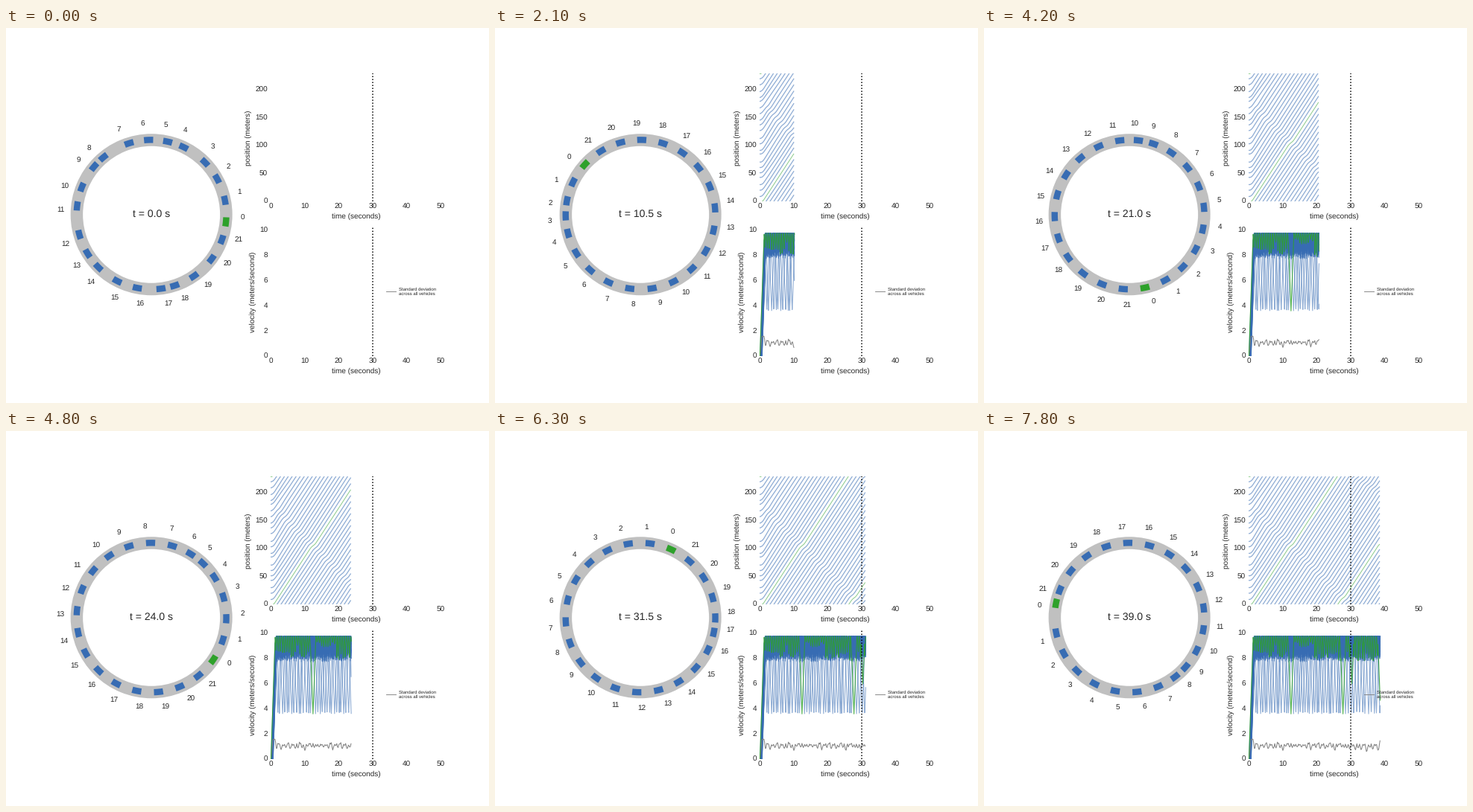
A matplotlib script for the animation above (8000 ms loop, 648x504 px).

```python
import numpy as np
import matplotlib.pyplot as plt
from matplotlib.animation import FuncAnimation
from matplotlib.patches import Wedge

plt.rcParams.update({"font.family": "Liberation Sans", "text.hinting": "none"})
W, H, DPI = 648, 504, 72
BLUE, GREEN, INK = "#376cb3", "#2ea12b", "#262626"
CARS, ROAD, CAR_DEG = 22, 230.0, 7.0
CENTER = (195.15, 250.75)
SPEED, DIP_LOSS, DIP_HALF = 9.31, 5.8, 1.05
SPACING = (ROAD + DIP_LOSS) / CARS
START_DEG = np.array([-2.1, 14.5, 32.1, 47.8, 68, 81, 95.7, 110.9, 133.5, 143.6, 162,
                      176.9, 199, 214.9, 228.3, 246.3, 262.6, 280.8, 291.6, 308.1, 327, 343.9])


def wave_times(n):
    """Moments at which the backward travelling wave reaches car n."""
    times = [12.4 - 0.695 * n + 15.3 * lap for lap in range(3)]
    times = [T + 0.22 * max(0, T - 28.5) for T in times]
    return times + [38.8] if n == 0 else times


def lost(t, T):
    """Distance lost in a triangular dip of speed centred on T."""
    if T < 1.8:
        return DIP_LOSS * np.ones_like(t)
    u = np.clip((t - T) / DIP_HALF, -1, 1)
    return DIP_LOSS * np.where(u < 0, (1 + u) ** 2 / 2, 1 - (1 - u) ** 2 / 2)


def steady(n, t):
    ramp = 1.3
    run = np.where(t < ramp, t ** 2 / (2 * ramp), t - ramp / 2)
    drift = -2.2 * np.sin(2 * np.pi * n / CARS) * t / 4 * np.exp(1 - t / 4)
    return -1.3 + n * SPACING + SPEED * run + drift - sum(lost(t, T) for T in wave_times(n))


def position(n, t):
    t = np.asarray(t, float)
    offset = START_DEG[n] * ROAD / 360 - steady(n, np.array(0.0))
    u = np.clip(t / 5, 0, 1)
    return steady(n, t) + offset * (1 - u * u * (3 - 2 * u))


rng = np.random.default_rng(4)
RATE, PHASE = rng.uniform(0.45, 0.65, CARS), rng.random(CARS)
DELAY, JITTER = rng.uniform(0, 0.65, CARS), rng.uniform(-0.2, 0.2, CARS)
DELAY[0] = JITTER[0] = 0
SWING = rng.uniform(0.6, 2.1, (CARS, 100))


def velocity(n, t):
    cycle = t / RATE[n] + PHASE[n]
    saw = np.abs(2 * (cycle % 1) - 1) ** 1.4
    swing = SWING[n, cycle.astype(int)]
    times = wave_times(n)
    if n == 0:
        calm = (t > times[0]) & (t < times[0] + 7)
        swing = np.where(calm, 0.5 * swing, swing)
    v = 9.8 - swing * saw
    for T in times:
        if T > 1.8:
            v = np.minimum(v, 3.6 + 6.2 * np.abs(t - T - JITTER[n]) / 0.85)
    if n == 0:
        v = np.minimum(v, 6 + 6 * np.abs(t - 30.3))
    return np.minimum(v, np.maximum(0, 7.8 * (t - DELAY[n])))


fig = plt.figure(figsize=(W / DPI, H / DPI), dpi=DPI, facecolor="white")


def panel(left, top, right, bottom, xlim, ylim):
    ax = fig.add_axes([left / W, 1 - bottom / H, (right - left) / W, (bottom - top) / H])
    ax.set(xlim=xlim, ylim=ylim)
    ax.axis("off")
    return ax


stage = panel(0, 0, W, H, (0, W), (H, 0))
pos_ax = panel(355.4, 60.5, 583.2, 233.4, (0, 50), (0, ROAD))
vel_ax = panel(355.4, 268, 583.2, 441, (0, 50), (0, 10.25))


def label(x, y, s, size=10, ax=stage, **kw):
    opts = dict(ha="center", va="center", color=INK, fontsize=size)
    return ax.text(x, y, s, **{**opts, **kw})


def frame_labels(base, step, unit_px, count, title, title_x, title_y):
    for i in range(count):
        label(351, base - i * step * unit_px + 0.3, str(i * step), ha="right")
    for s in range(0, 51, 10):
        label(355.4 + 4.556 * s, base + 7.2, str(s))
    label(469.3, base + 20.3, "time (seconds)")
    label(title_x, title_y, title, rotation=90)


frame_labels(233.4, 50, 0.75, 5, "position (meters)", 325.5, 148)
frame_labels(440.7, 2, 16.85, 6, "velocity (meters/second)", 331, 355.3)
for ax in (pos_ax, vel_ax):
    ax.axvline(30, color="black", ls=":", lw=1.5, zorder=5)

# legend
vel_ax.plot([34, 36.8], [5.14, 5.14], color="gray", lw=0.9, zorder=6)
for y, s in ((5.32, "Standard deviation"), (4.96, "across all vehicles")):
    label(37.7, y, s, 6, vel_ax, ha="left", zorder=6)

# road and cars
stage.add_patch(Wedge(CENTER, 108.5, 0, 360, width=16.5, fc="#c0c0c0", lw=0))
clock = label(195, 250.3, "", 14)
cars, tags = [], []
for n in range(CARS):
    cars.append(stage.add_patch(Wedge(CENTER, 104.6, 0, CAR_DEG, width=8.4,
                                      fc=GREEN if n == 0 else BLUE, lw=0)))
    tags.append(label(0, 0, str(n)))

# histories
STEPS = 20
TIME = np.arange(0, 40, 1 / STEPS)
TRACKS = [position(n, TIME) % ROAD for n in range(CARS)]
for track in TRACKS:
    track[1:][np.diff(track) < -ROAD / 2] = np.nan
SPEEDS = np.array([velocity(n, TIME) for n in range(CARS)])
SPREAD = SPEEDS.std(axis=0)


def history(ax, n, lw, alpha):
    return ax.plot([], [], color=GREEN if n == 0 else BLUE, lw=lw, alpha=alpha,
                   zorder=3 if n == 0 else 2)[0]


pos_lines = [history(pos_ax, n, 1.0 if n == 0 else 1.3, 0.55) for n in range(CARS)]
vel_lines = [history(vel_ax, n, 1.1, 0.85 if n == 0 else 0.55) for n in range(CARS)]
std_line, = vel_ax.plot([], [], color="gray", lw=1.0, zorder=2)


def update(i):
    t = 1.5 * (i // 3)
    clock.set_text(f"t = {t:.1f} s")
    p = round(max(0, t - 0.5) * STEPS)
    q = round(max(0, t - 0.3) * STEPS)
    for n in range(CARS):
        front = float(position(n, t)) * 360 / ROAD
        # the stage's y axis points down, so angles are negated
        cars[n].set_theta1(-front)
        cars[n].set_theta2(-front + CAR_DEG)
        a = np.radians(front)
        tags[n].set_position((CENTER[0] + 122 * np.cos(a), CENTER[1] - 122 * np.sin(a)))
        pos_lines[n].set_data(TIME[:p], TRACKS[n][:p])
        vel_lines[n].set_data(TIME[:q], SPEEDS[n][:q])
    std_line.set_data(TIME[:q:4], SPREAD[:q:4])
    return []


anim = FuncAnimation(fig, update, frames=80, interval=100, repeat=True, blit=False)
plt.show()
```
